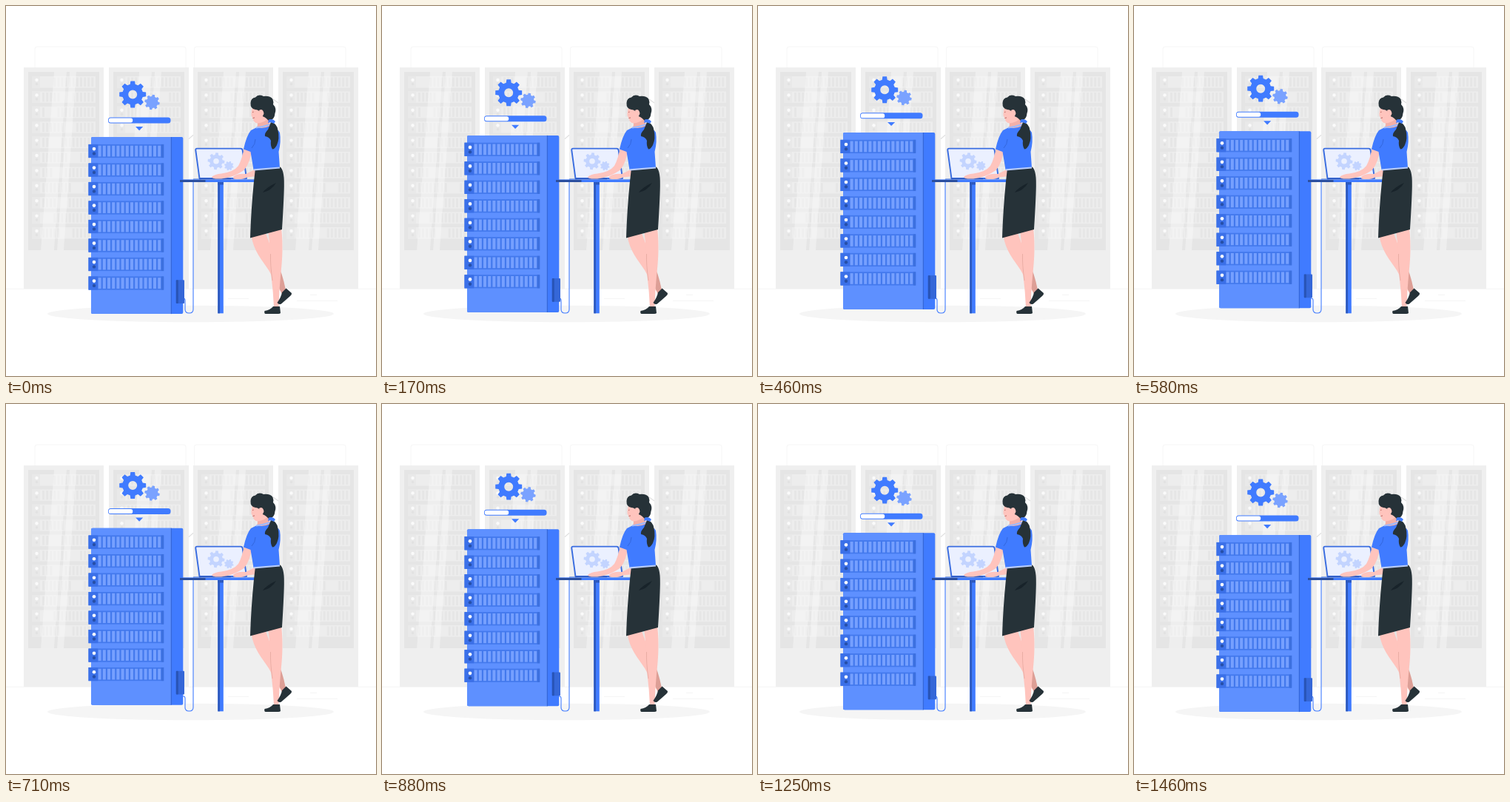
An HTML page for the animation above (1.5 s loop, 500 by 500 pixels).

```html
<!DOCTYPE html>
<html lang="en">
<head>
<meta charset="utf-8">
<title>Server room</title>
<style>
html, body { margin: 0; width: 100%; height: 100%; overflow: hidden; background: #fff; }
svg { display: block; width: 100vw; height: 100vh; }
</style>
</head>
<body>
<svg viewBox="0 0 500 500" xmlns="http://www.w3.org/2000/svg">
  <defs>
    <clipPath id="panel"><rect x="6" y="6" width="96" height="241"/></clipPath>
  </defs>

  <g fill="none" stroke="#f6f6f6">
    <path d="M39 83V58q0-3 3-3H240q3 0 3 3V83M254.500 83V58q0-3 3-3H456q3 0 3 3V83"/>
    <path d="M0 382.300H500M300 395.300H328M393 398.300H448M411 390.300H420" stroke="#ebebeb" stroke-width=".6"/>
    <path d="M246.500 180l7-6M361 126l7 5" stroke="#e0e0e0" stroke-width="1.200"/>
  </g>
  <g id="cabinets"></g>
  <ellipse cx="249.500" cy="416" rx="193.500" ry="11.300" fill="#f5f5f5"/>
  <path d="M238 395h2q2 0 2 3V410q0 5 5.500 5t5.500-5V236q0-2 3-2h8" fill="none" stroke="#407bff" stroke-width="1.100"/>

  <g id="server">
    <path id="gearBig" fill="#407bff" fill-rule="evenodd"/>
    <path id="gearSmall" fill="#7aa2ff"/>
    <rect x="138" y="150.700" width="84.500" height="8" rx="3.500" fill="#407bff"/>
    <rect x="138.800" y="151.700" width="32.400" height="6" rx="2.600" fill="#fff"/>
    <path d="M175 163.300h10.200l-5.100 5.200z" fill="#407bff"/>
    <rect x="115" y="177.400" width="124.300" height="239" rx="2" fill="#407bff"/>
    <path d="M223.300 177.400H117q-2 0-2 2V414.400q0 2 2 2H223.300z" fill="#5e90ff"/>
    <path d="M223.300 177.400V416.400" stroke="#2f5ec9" stroke-width=".9"/>
    <g id="units"></g>
    <rect x="229.800" y="370.500" width="11.200" height="31.700" rx="1" fill="#3567d8"/>
    <rect x="229.800" y="370.500" width="3" height="31.700" rx="1" fill="#2854b5"/>
  </g>

  <g id="desk">
    <rect x="286.300" y="237" width="7.500" height="178.300" fill="#407bff"/>
    <rect x="286.300" y="237" width="2.700" height="178.300" fill="#2d59bd"/>
    <rect x="286.300" y="237.500" width="7.500" height="4" fill="#2d59bd"/>
    <rect x="235" y="234.400" width="105" height="3.600" fill="#407bff"/>
    <rect x="235" y="235" width="34.500" height="3" fill="#2b4f9f"/>
    <path d="M253 233.700H284" stroke="#8fa9dd" stroke-width="1.200"/>
    <path d="M258 192.600H317q2.300 0 2.700 2.400L325 233H261.500L256.300 195q-.3-2.400 1.700-2.400z" fill="#ebf0ff" stroke="#3a6de0" stroke-width="1.900" stroke-linejoin="round"/>
    <path d="M261 233.500H304" stroke="#2d59bd" stroke-width="1.600"/>
    <path id="iconBig" fill="#c3d4ff" fill-rule="evenodd"/>
    <path id="iconSmall" fill="#c3d4ff"/>
  </g>

  <g id="woman">
    <path d="M331.500 311L351 307C357 324 364 341 371 359Q374 370 378 384L373 389Q364 374 355 357C345 342 335 331 331.500 311z" fill="#ffc4bd"/>
    <path d="M365 346Q373 358 378 384L373 389Q366 376 363 364z" fill="#dd9f96"/>
    <path d="M354 303L372 300C375 323 373 348 371 365Q369 386 368.500 407H362Q361 385 358.500 365C357 342 357 326 354 303z" fill="#ffc4bd"/>
    <path d="M357.500 335Q357 350 360 371" fill="none" stroke="#e5a79f" stroke-width=".8"/>
    <path d="M361 406H370L371 415Q370 416 368 416H350.500Q348.500 415 349.500 412Q357 411 361 406z" fill="#263238"/>
    <path d="M378.500 381.500L386 388Q386.500 390 384 392L372 402.500Q368.500 404 366.500 401Q372 393 373 387z" fill="#263238"/>
    <path d="M338 220L324 227Q312 226 307 231Q306 234 311 234Q321 234.500 326 231.500L339 230z" fill="#ffc4bd"/>
    <path d="M337 219L370.500 217.500Q376 222 375.800 240Q376 253 373 302L330 313.500Q331 277 335 237z" fill="#263238"/>
    <path d="M365 239Q352 245 347 252Q358 250 365 239z" fill="#18232a"/>
    <path d="M322.500 189L332 192Q331 211 321.500 222Q307 232 291 233.500Q278 234 278 231Q282 227 291 226.500Q308 224 314 216Q319 207 322.500 189z" fill="#ffc4bd"/>
    <path d="M339 164Q350 159.500 358 162Q367 166 370 171Q372 183 368.500 197L370 218.500L334.500 221L330.500 197L321 193.500Q325 175 331 168z" fill="#407bff"/>
    <path d="M332 192Q337 187 337 180" fill="none" stroke="#2f61d4" stroke-width=".8"/>
    <path d="M335 221.300L370 218.500" stroke="#b9cdff" stroke-width="2.200"/>
    <path d="M339 154L354 149L357 162Q348 166.500 339 164Q341 160 339 154z" fill="#f3b0a8"/>
    <path d="M338 164.500Q348 163 357 160" fill="none" stroke="#9dbaff" stroke-width="2.200"/>
    <path d="M334 134Q331 143 331.500 148L333.500 152Q335 158 340 158.500Q349 158 355 151L357 137L345 131z" fill="#ffc4bd"/>
    <path d="M333.500 151.500l2.500-.6M333 143.500l1.600-.4" stroke="#a8524d" stroke-width=".8"/>
    <path d="M330.500 131Q331 124 337 123.500Q341 118.500 348 122Q357 121 360.500 126Q362 130 361 133Q366 138 363.500 145Q363 154 355 155Q351 151 349 150Q345 149 344 144Q341 140 337 140Q330 139 330.500 131z" fill="#263238"/>
    <path d="M342 141Q347 138 348.500 145Q347 151 343.500 150z" fill="#ffc4bd"/>
    <path d="M358 157Q366 158 367.500 168Q370 179 366 188Q363 193.500 360 193.500Q357 189 358 182Q356 177 350 176Q349 172 354 167z" fill="#263238"/>
    <path d="M355 153.500Q361 152 364 156L362 159Q358 156 354 158z" fill="#407bff"/>
  </g>
</svg>
<script>
const byId = id => document.getElementById(id);
const rect = (x, y, w, h, fill, more = "") =>
  `<rect x="${x}" y="${y}" width="${w}" height="${h}" fill="${fill}" ${more}/>`;
const dot = (x, y, r, fill) => `<circle cx="${x}" cy="${y}" r="${r}" fill="${fill}"/>`;

function gear(id, cx, cy, inner, outer, hole, turn = 0) {
  const teeth = 8, step = 2 * Math.PI / teeth;
  const points = [];
  for (let i = 0; i < teeth; i++) {
    for (const [shift, r] of [[-.32, inner], [-.2, outer], [.2, outer], [.32, inner]]) {
      const a = (i + shift) * step + turn;
      points.push((cx + r * Math.cos(a)).toFixed(2) + " " + (cy + r * Math.sin(a)).toFixed(2));
    }
  }
  const ring = hole
    ? `M${cx - hole} ${cy}a${hole} ${hole} 0 1 0 ${2 * hole} 0a${hole} ${hole} 0 1 0 ${-2 * hole} 0z`
    : "";
  byId(id).setAttribute("d", "M" + points.join("L") + "z" + ring);
}

function cabinet(x, index) {
  let s = rect(0, 0, 108, 299, "#efefef") + rect(6, 6, 96, 241, "#e5e5e5");
  for (let row = 0; row < 11; row++) {
    const y = 12 + row * 20.4;
    s += rect(11, y, 86, 15.5, "#ededed") + rect(11, y, 11, 15.5, "#e9e9e9");
    s += dot(17.5, y + 5, 2.2, "#fafafa") + dot(17.5, y + 10.5, 1.8, "#e2e2e2");
    const gap = (row * 5 + index * 3) % 9;
    for (let i = 0; i < 14; i++) {
      if (i >= gap && i < gap + 3) continue;
      s += rect(25 + i * 5.1, y + 1.5, 3, 12.5, "#e6e6e6");
    }
  }
  s += `<path d="M41 6H58L41 247H23zM62 6H71L54 247H45z" fill="#fff" opacity=".33" clip-path="url(#panel)"/>`;
  return `<g transform="translate(${x} 83)">${s}</g>`;
}

function unit(y) {
  let s = rect(111.5, y, 101.7, 18.2, "#4379ed") + rect(111.5, y, 12.6, 18.2, "#3b70e8");
  s += rect(209.8, y, 3.4, 18.2, "#3c70df");
  for (let i = 0; i < 14; i++) s += rect(124.6 + i * 6.2, y + 1.8, 4, 14.7, "#76a0ff");
  return s + dot(119, y + 6.2, 2.3, "#fff") + dot(119, y + 12.5, 2.2, "#264fa8");
}

byId("cabinets").innerHTML = [24, 139, 253, 368].map(cabinet).join("");
byId("units").innerHTML = Array.from({ length: 8 }, (_, i) => unit(187.2 + i * 25.5)).join("");
gear("gearBig", 171.2, 119.7, 14, 18.2, 6);
gear("gearSmall", 197.5, 130.3, 8, 10.3, 0, .2);
gear("iconBig", 284, 209.7, 8.8, 11.5, 3.8, .1);
gear("iconSmall", 301.3, 216, 5, 6.4, 0, .3);

// The server floats 10 px up and back, linearly, at 24 steps a second.
const LOOP = 1500, STEPS = 36, RISE = 10;
const server = byId("server");

function draw() {
  const step = Math.floor((performance.now() % LOOP) * STEPS / LOOP + .1) % STEPS;
  const phase = (step + .5) / STEPS;
  const lift = RISE * (1 - Math.abs(2 * phase - 1));
  server.setAttribute("transform", `translate(0 ${-lift.toFixed(3)})`);
  requestAnimationFrame(draw);
}
draw();
</script>
</body>
</html>
```
